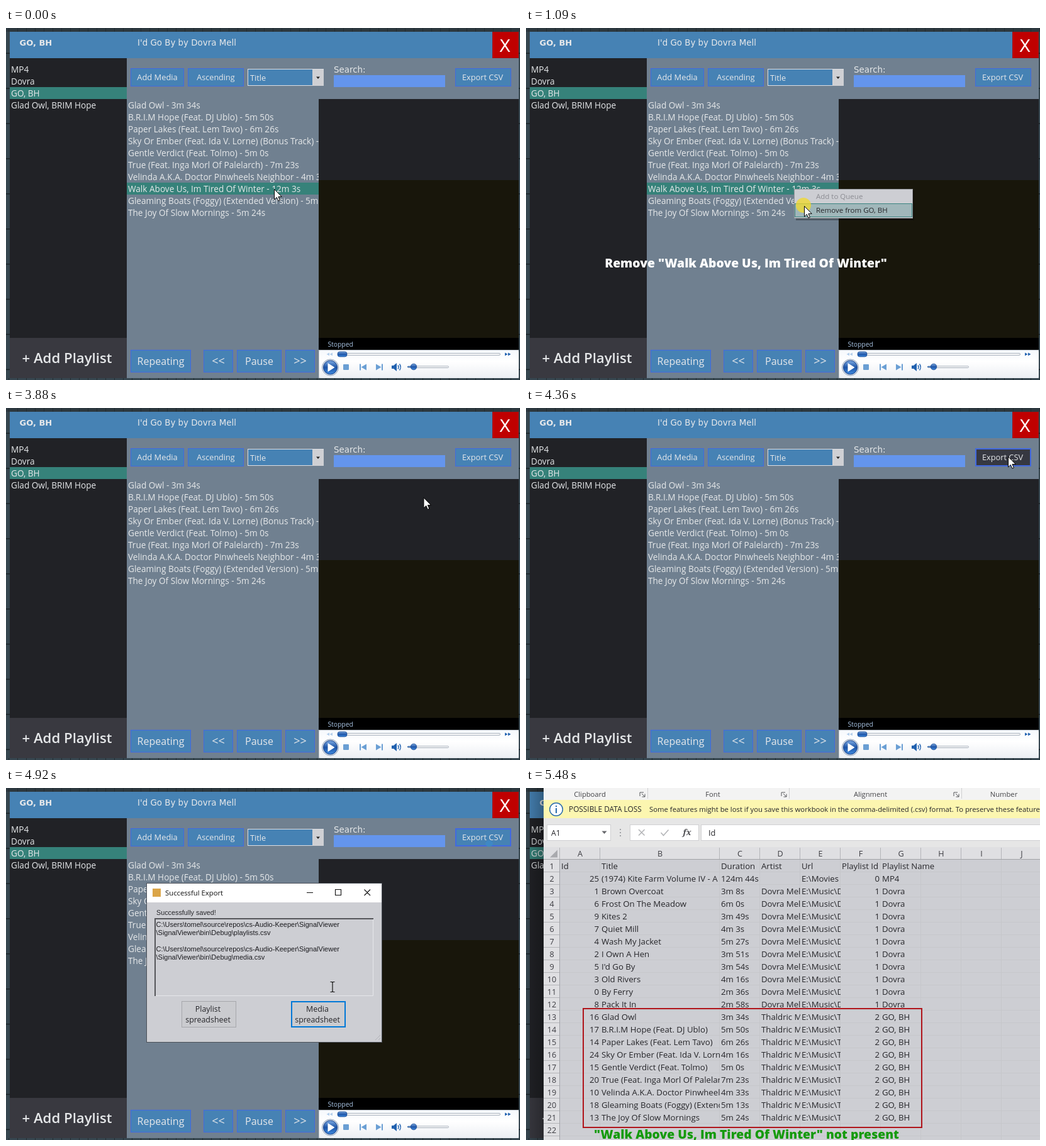
An HTML page for the animation above (8570 ms loop, 817 by 560 pixels).

```html
<!DOCTYPE html>
<html lang="en">
<head>
<meta charset="utf-8">
<title>Playlist export</title>
<style>
  html, body { margin: 0; width: 100%; height: 100%; overflow: hidden; background: #33424b; }
  svg { display: block; }
  text { font-family: "Open Sans", "Noto Sans", sans-serif; white-space: pre; }
  .wide { font-family: "DejaVu Sans", sans-serif; }
  .plain { font-family: "Liberation Sans", Arial, sans-serif; }
  .mid { text-anchor: middle; }
  .end { text-anchor: end; }
  .semi { font-weight: 600; }
  .bold { font-weight: 700; }
  .heavy { font-weight: 800; }
</style>
</head>
<body>
<svg id="stage" width="817" height="560" viewBox="0 0 817 560"></svg>
<script>
const LOOP = 8570;
const STEEL = '#4682b4', ROYAL = '#4169e1', SLATE = '#708090', DARK = '#212226',
      TEAL = '#36827a', PALE = '#e6e8ea', PANEL = '#cdced3', INK = '#26262a';

// ---- drawing helpers ----
const esc = s => String(s).replace(/&/g, '&amp;').replace(/</g, '&lt;');
const rect = (x, y, w, h, fill, extra = '') =>
  `<rect x="${x}" y="${y}" width="${w}" height="${h}" fill="${fill}" ${extra}/>`;
const frame = (x, y, w, h, fill, line, lw = 1) =>
  rect(x + lw / 2, y + lw / 2, w - lw, h - lw, fill, `stroke="${line}" stroke-width="${lw}"`);
const text = (x, y, s, size, fill, cls = '') =>
  `<text x="${x}" y="${y}" font-size="${size}" fill="${fill}" class="${cls}">${esc(s)}</text>`;
const path = (d, fill, line = 'none', lw = 1) =>
  `<path d="${d}" fill="${fill}" stroke="${line}" stroke-width="${lw}"/>`;
const group = (id, body) => `<g id="${id}">${body}</g>`;
const clip = (x, y, w, h, body) => `<svg x="${x}" y="${y}" width="${w}" height="${h}">${body}</svg>`;
const button = (x, y, w, h, s, size, base) =>
  frame(x, y, w, h, STEEL, ROYAL) + text(x + w / 2, base, s, size, PALE, 'mid');

// ---- content ----
const LIST = 'GO, BH', ACT = 'Dovra Mell', SOLO = 'Dovra';
const REMOVED = 'Walk Above Us, Im Tired Of Winter';
const songs = [
  [16, 'Glad Owl', '3m 34s'],
  [17, 'B.R.I.M Hope (Feat. DJ Ublo)', '5m 50s'],
  [14, 'Paper Lakes (Feat. Lem Tavo)', '6m 26s'],
  [24, 'Sky Or Ember (Feat. Ida V. Lorne) (Bonus Track)', '4m 16s'],
  [15, 'Gentle Verdict (Feat. Tolmo)', '5m 0s'],
  [20, 'True (Feat. Inga Morl Of Palelarch)', '7m 23s'],
  [10, 'Velinda A.K.A. Doctor Pinwheels Neighbor', '4m 33s'],
  [18, 'Gleaming Boats (Foggy) (Extended Version)', '5m 13s'],
  [13, 'The Joy Of Slow Mornings', '5m 24s']
];
const others = [
  [1, 'Brown Overcoat', '3m 8s'], [6, 'Frost On The Meadow', '6m 0s'],
  [9, 'Kites 2', '3m 49s'], [7, 'Quiet Mill', '4m 3s'],
  [4, 'Wash My Jacket', '5m 27s'], [2, 'I Own A Hen', '3m 51s'],
  [5, "I'd Go By", '3m 54s'], [3, 'Old Rivers', '4m 16s'],
  [0, 'By Ferry', '2m 36s'], [8, 'Pack It In', '2m 58s']
];

// ---- player window ----
function desktop() {
  let s = rect(0, 0, 817, 560, '#36464f') + rect(0, 0, 817, 6, '#2c383f');
  for (let x = 4; x < 817; x += 14) s += rect(x, 0, 1, 6, '#232d33') + rect(x, 557, 1, 3, '#232d33');
  for (let k = 0; k < 10; k++) s += rect(0, 39.5 + 55.9 * k, 817, 1.5, '#1b2327');
  return s;
}

function songRow(i, name, time) {
  return text(2, 15 + 19 * i, `${name} - ${time}`, 13.6, PALE);
}

function transport() {
  const blue = '#6a9fd4', deep = '#2262b0';
  const arrows = (x, c) => [0, 5].map(k => path(`M${x + k} 516.5v5l4.5 -2.5z`, c)).join('');
  return rect(497, 493, 318, 19, '#000') + text(511.5, 507, 'Stopped', 10.3, '#a9c4e4') +
    rect(497, 512, 318, 45, '#c4c9d0') +
    rect(498, 513, 317, 44, 'url(#chrome)', 'rx="2"') +
    path('M519 516.5v5l-4.5 -2.5zM514 516.5v5l-4.5 -2.5z', '#b4cfec') + arrows(793, deep) +
    rect(528.5, 517.5, 257, 3, '#fff', 'rx="1.5" stroke="#a3acb8"') +
    rect(527, 515, 15, 8, 'url(#knob)', 'rx="3.5" stroke="#1c4c92" stroke-width=".8"') +
    '<circle cx="515.5" cy="540" r="13" fill="#dbe4ef" stroke="#94a4bb"/>' +
    '<circle cx="515.5" cy="540" r="11" fill="url(#knob)" stroke="#173f86"/>' +
    path('M511.5 533v14l11 -7z', '#fff') +
    rect(536, 535, 9, 9, blue, 'rx="1"') +
    path('M562 534.5h2v10h-2zM573 534.5v10l-8.5 -5z', blue) +
    path('M588 534.5v10l8.5 -5zM597 534.5h2v10h-2z', blue) +
    path('M613 537h3l5 -4v13l-5 -4h-3z', deep) +
    path('M623 536.5q2 3 0 6M625.5 534.5q3.5 5 0 10', 'none', deep, 1.4) +
    rect(638.5, 538, 65, 2.5, '#fff', 'rx="1.2" stroke="#a3acb8"') +
    path('M638 539h6', 'none', deep, 1.5) +
    '<circle cx="648" cy="539" r="4.8" fill="url(#knob)" stroke="#1c4c92" stroke-width=".8"/>';
}

function player() {
  const side = ['MP4', SOLO, LIST, 'Glad Owl, BRIM Hope'];
  return desktop() +
    rect(6, 6, 809, 551, SLATE) + rect(6, 6, 809, 42, STEEL) +
    text(21.5, 28, LIST, 13, PALE, 'wide bold') +
    text(209, 28, `I'd Go By by ${ACT}`, 13.4, PALE, 'wide') +
    frame(773, 6, 42, 42, '#c00000', '#a30d10') + text(793, 38, 'X', 27, '#fff', 'mid wide') +
    rect(6, 48, 186, 445, DARK) + rect(6, 94, 186, 19, TEAL) +
    side.map((s, i) => text(8, 71 + 19 * i, s, 13.6, PALE)).join('') +
    rect(6, 493, 186, 64, '#393940') + text(25.5, 533, '+ Add Playlist', 22.2, PALE, 'semi') +
    button(198, 64, 85, 29, 'Add Media', 12.9, 83) +
    button(289, 64, 89, 29, 'Ascending', 12.6, 83) +
    frame(384, 65, 121, 27, STEEL, '#dcdfe4') + text(388, 84, 'Title', 12.8, PALE) +
    rect(487, 66, 18, 26, '#cfd0d4') + path('M493 77.5h6l-3 3.4z', '#222') +
    text(521, 71, 'Search:', 13.4, PALE, 'wide') + rect(521, 75, 177, 19, '#6495ed') +
    '<rect id="exportBox"/>' + text(757.5, 83, 'Export CSV', 12.8, PALE, 'mid') +
    '<ellipse id="spot" cx="768" cy="88.5" rx="6" ry="5" fill="#3f88c4"/>' +
    clip(192, 113, 305, 380,
      songs.slice(0, 7).map((r, i) => songRow(i, r[1], r[2])).join('') +
      group('before', rect(0, 133, 305, 19, TEAL) + songRow(7, REMOVED, '12m 3s') +
        songs.slice(7).map((r, i) => songRow(8 + i, r[1], r[2])).join('')) +
      group('after', songs.slice(7).map((r, i) => songRow(7 + i, r[1], r[2])).join(''))) +
    rect(497, 113, 318, 129, DARK) + rect(497, 242, 318, 251, '#18160b') +
    button(198, 512, 96, 36, 'Repeating', 16, 536) +
    button(314, 512, 47, 36, '<<', 18, 536) +
    button(367, 512, 71, 36, 'Pause', 16, 536) +
    button(444, 512, 47, 36, '>>', 18, 536) + transport();
}

function menu() {
  return rect(429, 259, 188, 47, '#000', 'opacity=".3"') +
    frame(426, 256, 189, 47, PANEL, '#96979d') +
    text(461, 272, 'Add to Queue', 11.5, '#8c8d93') +
    frame(427, 279, 187, 22, '#a0b7ba', '#3a8480') +
    text(461, 294, `Remove from ${LIST}`, 11.5, INK);
}

function dialog() {
  const root = 'C:\\Users\\tomel\\source\\repos\\cs-Audio-Keeper\\SignalViewer';
  const lines = [root, '\\SignalViewer\\bin\\Debug\\playlists.csv', '', root, '\\SignalViewer\\bin\\Debug\\media.csv'];
  const label = (x, a) => text(x, 356, a, 12.4, INK, 'mid') + text(x, 373, 'spreadsheet', 12.4, INK, 'mid');
  return frame(223, 151, 375, 254, PANEL, '#4b5058') + rect(224, 152, 373, 30, '#fff') +
    rect(233, 160, 13, 13, '#dba548') + text(253, 171, 'Successful Export', 11.3, '#111') +
    path('M478 166.5h10M523.5 161.5h9v9h-9zM569.5 161.5l9.5 9.5M579 161.5l-9.5 9.5', 'none', '#111', 1.1) +
    text(239, 202, 'Successfully saved!', 10.8, INK, 'plain') +
    path('M236 330.5h347.5v-123', 'none', '#e6e7ea') +
    path('M237 331v-123h347', 'none', '#55565a', 2) +
    lines.map((s, i) => text(238.5, 221 + 13 * i, s, 11, '#1c1c20', 'plain')).join('') +
    frame(279, 339, 87, 42, '#cacbcf', '#a6a7ab') + label(321, 'Playlist') +
    '<rect id="mediaBox" x="454" y="340" width="85" height="40" stroke="#0078d7" stroke-width="2"/>' +
    label(495, 'Media') +
    path('M595 393l-8 8M595 398l-3 3', 'none', '#b2b3b8', 1);
}

// ---- spreadsheet ----
const EDGES = [54, 118, 308, 372, 436, 500, 564, 628, 692, 756, 820];
const HEAD = '#dfdfe2', GRID = '#c6c7cb', RULE = '#b4b5b9';

function cell(col, row, s, span = 1) {
  const x = EDGES[col], w = EDGES[col + span] - x;
  const right = typeof s === 'number';
  return clip(x, 94 + 20 * row, w, 20, text(right ? w - 2 : 2, 15, s, 13.2, INK, right ? 'end' : ''));
}

function record(row, [id, title, time], artist, url, num, list) {
  return [id, title, time, artist, url, num, list].map((v, c) => cell(c, row, v)).join('');
}

function launcher(x) {
  return path(`M${x} 13v-6h6M${x + 3} 9l5 5m0 -4.5v4.5h-4.5`, 'none', '#55565a', 1);
}

function sheet() {
  let s = rect(0, 0, 28, 560, 'url(#shade)') + rect(28, 0, 789, 560, '#e6e6e6') +
    rect(28, 0, 789, 19, '#f3f3f3');
  [['Clipboard', 101.5], ['Font', 297], ['Alignment', 547.5], ['Number', 759.5]]
    .forEach(([name, x]) => s += text(x, 14, name, 11.2, '#444448', 'mid'));
  [193, 418, 692].forEach(x => s += rect(x, 0, 1, 17, '#d0d0d2') + launcher(x - 12));
  s += rect(28, 19, 789, 29, '#fcf6b0') +
    '<circle cx="48" cy="34" r="10.3" fill="#fff" stroke="#2a6cab" stroke-width="1.5"/>' +
    rect(47, 32, 2, 8, '#2a6cab') + rect(47, 28, 2, 2, '#2a6cab') +
    text(68, 38, 'POSSIBLE DATA LOSS', 11.85, INK) +
    text(196, 38, 'Some features might be lost if you save this workbook in the comma-delimited (.csv) format. To preserve these features, save it', 11.3, INK);
  s += frame(33, 58, 102, 26, '#fff', '#d0d0d2') + text(40, 76, 'A1', 12.2, INK) +
    path('M120.5 68.5h8l-4 4.5z', '#66676b') +
    [65, 70, 75].map(y => rect(149, y, 2, 2, '#a2a3a7')).join('') +
    frame(165, 58, 110, 26, '#fff', '#d0d0d2') +
    path('M179 66l9.5 9.5M188.5 66l-9.5 9.5M214.5 71l4 4.5l8 -9', 'none', '#b4b5b8', 1.6) +
    '<text x="256" y="75" font-size="13" font-style="italic" font-weight="600" fill="#4a4a4e" class="mid" style="font-family:\'Noto Serif\',serif">fx</text>' +
    frame(278, 58, 545, 26, '#fff', '#d0d0d2') + text(290, 76, 'Id', 12.8, INK);

  s += rect(28, 94, 789, 466, HEAD) + rect(54, 114, 763, 446, PANEL) + path('M50 98.5v12h-12z', '#a9aaae');
  EDGES.slice(0, 10).forEach((x, i) => {
    s += rect(x - 1, 95, 1, 19, RULE) + rect(x - 1, 114, 1, 446, GRID) +
      text((x + EDGES[i + 1]) / 2, 109, 'ABCDEFGHIJ'[i], 12.6, '#3c3c42', 'mid');
  });
  for (let n = 1; n <= 22; n++) {
    const y = 94 + 20 * n;
    s += rect(28, y + 19, 26, 1, RULE) + rect(54, y + 19, 763, 1, GRID) +
      text(41, y + 15, n, 12.6, '#3c3c42', 'mid');
  }
  s += rect(28, 113, 789, 1, '#a2a3a7') + rect(53, 114, 1, 446, '#a2a3a7');

  ['Id', 'Title', 'Duration', 'Artist', 'Url', 'Playlist Id', 'Playlist Name']
    .forEach((h, c) => s += cell(c, 1, h, c === 6 ? 2 : 1));
  s += record(2, [25, '(1974) Kite Farm Volume IV - A Long Harvest', '124m 44s'], '', 'E:\\Movies', 0, 'MP4');
  others.forEach((r, i) => s += record(3 + i, r, ACT, 'E:\\Music\\Dovra', 1, SOLO));
  songs.forEach((r, i) => s += record(13 + i, r, 'Thaldric Moor', 'E:\\Music\\Thaldric', 2, LIST));
  return s + rect(91, 351, 538, 189, 'none', 'stroke="#b0151b" stroke-width="2"') +
    text(350.5, 558, `"${REMOVED}" not present`, 19.3, '#159a0c', 'mid heavy');
}

const defs = `<defs>
  <linearGradient id="chrome" x2="0" y2="1"><stop stop-color="#f6f9fd"/><stop offset=".4" stop-color="#fff"/><stop offset="1" stop-color="#eceff4"/></linearGradient>
  <linearGradient id="knob" x2="0" y2="1"><stop stop-color="#7facE4"/><stop offset=".5" stop-color="#1d53a6"/><stop offset="1" stop-color="#3f8ade"/></linearGradient>
  <linearGradient id="shade"><stop stop-color="#000" stop-opacity=".02"/><stop offset="1" stop-color="#000" stop-opacity=".28"/></linearGradient>
</defs>`;

document.getElementById('stage').innerHTML = defs + player() +
  group('menu', menu()) + group('dialog', dialog()) +
  group('caption', text(349.5, 381, `Remove "${REMOVED}"`, 19.3, '#fff', 'mid heavy')) +
  '<circle id="click" r="12" fill="#f2da2c" opacity=".76"/>' +
  group('arrow', path('M.5 .5V17L4.3 13.4L6.9 19.2L9.4 18.1L6.9 12.4H12.2Z', '#fff', '#000')) +
  group('beam', path('M-3.5 -7.5h2.5l1 1l1 -1h2.5M0 -6.5v14M-3.5 8.5h2.5l1 -1l1 1h2.5', 'none', '#111', 1.2)) +
  group('sheet', sheet());

// ---- timeline ----
const runs = [[0, 0, 1], [80, 630, 8], [940, 940, 1], [1090, 1090, 1], [3170, 3170, 1],
              [3560, 4120, 8], [4280, 5070, 11], [5160, 5480, 5]];
const ticks = runs.flatMap(([a, b, n]) =>
  Array.from({ length: n }, (_, i) => a + (n > 1 ? (b - a) * i / (n - 1) : 0)));
const snap = t => ticks.filter(k => k <= t).pop();

const smooth = p => p * p * (3 - 2 * p);
const linear = p => p;
function along(keys, t, ease) {
  const i = keys.findIndex(k => k[0] > t);
  if (i === 0) return keys[0].slice(1);
  if (i < 0) return keys[keys.length - 1].slice(1);
  const a = keys[i - 1], b = keys[i], p = ease((t - a[0]) / (b[0] - a[0]));
  return a.slice(1).map((v, k) => v + (b[k + 1] - v) * p);
}

const reach = [[0, 426, 256], [230, 426, 256], [630, 442, 283], [3480, 442, 283], [4120, 766, 77]];
const descend = [[4359, 766, 77], [4912, 519, 316], [5070, 480, 364]];
const menuFade = [[80, 0], [237, 1]];
const dialogFade = [[4359, 0], [4600, 1], [5240, 1], [5400, .25]];
const clicks = [[80, 150], [940, 3170], [4280, 4350], [5160, 5240]];

const $ = id => document.getElementById(id);
const put = (el, attrs) => { for (const k in attrs) el.setAttribute(k, attrs[k]); };
const show = (id, on) => put($(id), { visibility: on ? 'visible' : 'hidden' });
const inside = (x, y, l, t, r, b) => x > l && x < r && y > t && y < b;

function draw(now) {
  const t = snap(now);
  const [x, y] = t < 4359 ? along(reach, t, smooth) : along(descend, t, linear);
  const fade = along(dialogFade, t, linear)[0];
  const open = fade > 0, zoom = .96 + .04 * fade;

  show('before', t < 3170);
  show('after', t >= 3170);
  put($('menu'), { opacity: t < 3170 ? along(menuFade, t, linear)[0] : 0 });
  show('caption', t >= 1090 && t < 3170);
  show('click', clicks.some(([a, b]) => t >= a && t < b));
  put($('click'), { cx: x - 1, cy: y - 1 });

  const lw = t >= 4280 ? 2 : 1;
  put($('exportBox'), {
    x: 714 + lw / 2, y: 64 + lw / 2, width: 89 - lw, height: 29 - lw,
    fill: inside(x, y, 714, 64, 803, 94) ? '#363841' : STEEL, stroke: ROYAL, 'stroke-width': lw
  });
  show('spot', t >= 4500);

  put($('dialog'), {
    opacity: fade,
    transform: `translate(410 278) scale(${zoom}) translate(-410 -278)`
  });
  put($('mediaBox'), { fill: inside(x, y, 453, 339, 540, 381) ? '#b9cbd8' : '#cacbcf' });

  const typing = open && inside(x, y, 236, 207, 584, 331);
  show('arrow', !typing);
  show('beam', typing);
  ['arrow', 'beam'].forEach(id => put($(id), { transform: `translate(${x} ${y})` }));
  show('sheet', t >= 5480);
}

const start = performance.now();
function tick() {
  draw((performance.now() - start) % LOOP);
  requestAnimationFrame(tick);
}
tick();
</script>
</body>
</html>
```
